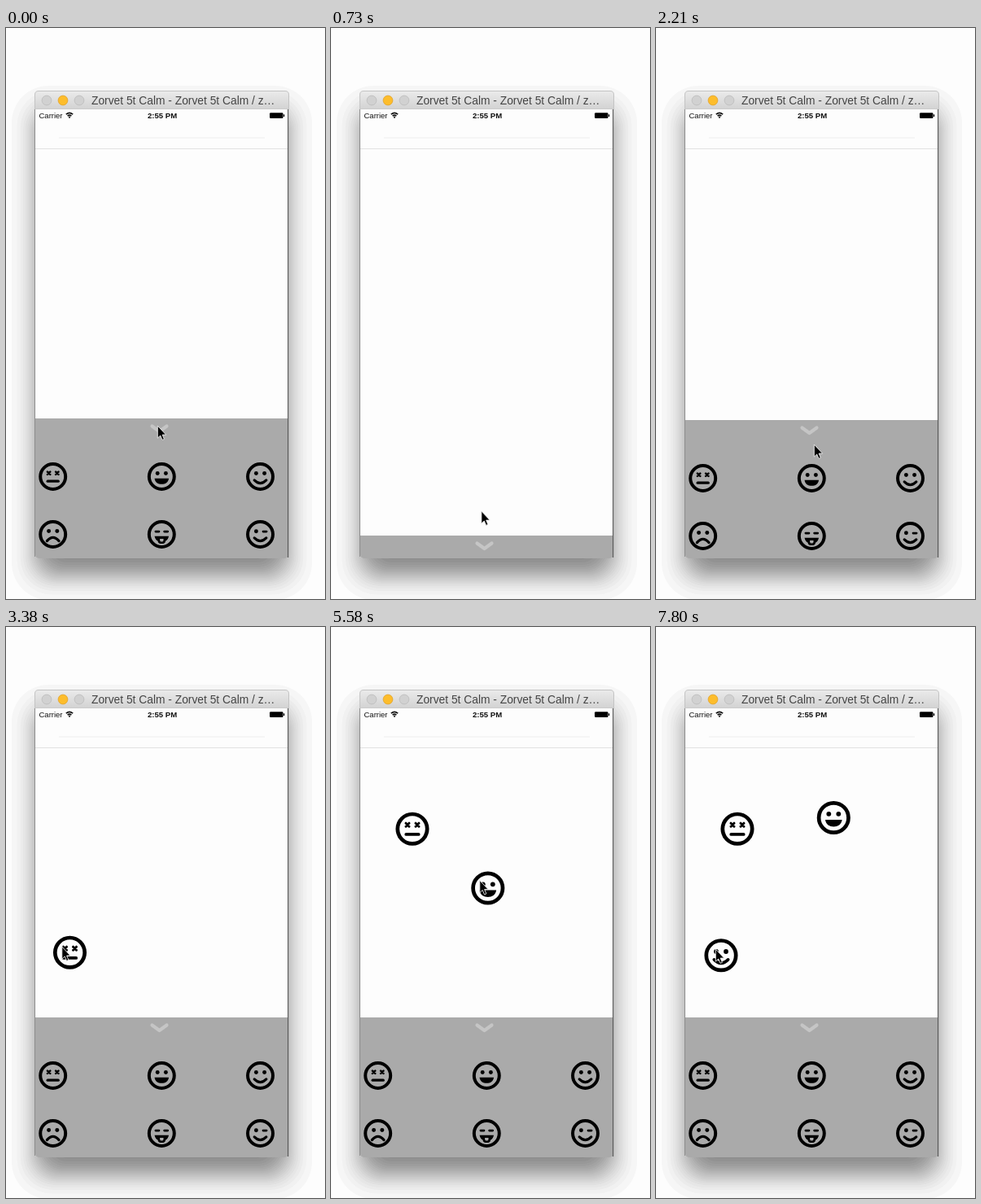
Recreate the animation shown at these times as an HTML page. Size 392 by 702 pixels, loop 8000 ms.

```html
<!DOCTYPE html>
<html lang="en">
<head>
<meta charset="utf-8">
<title>Emoji tray</title>
<style>
html, body { margin: 0; width: 100%; height: 100%; overflow: hidden; background: #fdfdfd; }
svg { display: block; width: 392px; height: 702px; }
text { font-family: "Liberation Sans", Arial, sans-serif; }
.line { fill: none; stroke: #000; stroke-linecap: round; stroke-linejoin: round; stroke-width: 3.8; }
.thin { stroke-width: 3; }
</style>
</head>
<body>
<svg viewBox="0 0 392 702">
  <defs>
    <linearGradient id="bar" x2="0" y2="1">
      <stop offset="0" stop-color="#ebebeb"/>
      <stop offset="1" stop-color="#d2d2d2"/>
    </linearGradient>
    <clipPath id="screen"><path d="M36 100H347V648q0 4-4 4H40q-4 0-4-4Z"/></clipPath>
    <circle id="ring" r="18.2" class="line" style="stroke-width:4.7"/>
    <g id="eyes"><circle cx="-6" cy="-4.7" r="2.9"/><circle cx="6" cy="-4.7" r="2.9"/></g>
    <path id="beam" class="line" d="M-8.6 5.2Q0 14 8.6 5.2"/>
    <g id="dead">
      <use href="#ring"/>
      <path class="line thin" d="M-8-7l4 4m0-4l-4 4M4-7l4 4m0-4l-4 4"/>
      <path class="line" d="M-7.7 6.7H7.7"/>
    </g>
    <g id="grin">
      <use href="#ring"/><use href="#eyes"/>
      <path d="M-10.3 2.5H10.3C9.5 8.2 5.2 11 0 11S-9.5 8.2-10.3 2.5Z"/>
    </g>
    <g id="smile"><use href="#ring"/><use href="#eyes"/><use href="#beam"/></g>
    <g id="sad">
      <use href="#ring"/><use href="#eyes"/>
      <path class="line" d="M-8.6 9.6Q0-.6 8.6 9.6"/>
    </g>
    <g id="tongue">
      <use href="#ring"/>
      <path class="line thin" d="M-8.8-4h5M3.8-4h5"/>
      <path d="M-10.3 2.5H10.3C9.5 6.5 7.5 8.6 5.5 9.6a5.5 4 0 0 1-11 0C-7.5 8.6-9.5 6.5-10.3 2.5Z"/>
      <path d="M-2.6 6.4H2.6V8.4a2.6 2.2 0 0 1-5.2 0Z" fill="#aaa"/>
    </g>
    <g id="wink">
      <use href="#ring"/><use href="#beam"/>
      <circle cx="-6" cy="-4.4" r="2.9"/>
      <path class="line thin" d="M4-4h5"/>
    </g>
  </defs>

  <rect width="392" height="702" fill="#fdfdfd"/>
  <g id="shadow"></g>

  <path d="M35.5 100V82q0-4.5 4.5-4.5H343q4.5 0 4.5 4.5V100Z" fill="url(#bar)" stroke="#c4c4c4"/>
  <g stroke-width=".8">
    <circle cx="50" cy="89" r="5.9" fill="#d1d1d1" stroke="#bcbcbc"/>
    <circle cx="70" cy="89" r="5.9" fill="#fdbd2c" stroke="#e0a32c"/>
    <circle cx="90" cy="89" r="5.9" fill="#d1d1d1" stroke="#bcbcbc"/>
  </g>
  <text x="105" y="94" font-size="13.8" fill="#454545">Zorvet 5t Calm - Zorvet 5t Calm / z…</text>

  <g clip-path="url(#screen)">
    <rect x="36" y="100" width="311" height="552" fill="#fdfdfd"/>
    <path d="M36 99.5H347" stroke="#b5b5b5"/>
    <text x="40.5" y="111" font-size="9.5" fill="#111">Carrier</text>
    <text x="174" y="111" font-size="9.6" font-weight="bold" fill="#111">2:55 PM</text>
    <g fill="none" stroke="#111" stroke-width="1.6">
      <path d="M73.8 106.2q4.2-3.6 8.4 0M75.6 108.1q2.4-1.9 4.8 0"/>
      <circle cx="78" cy="109.6" r=".4"/>
    </g>
    <rect x="324" y="104.3" width="16.5" height="6.6" rx="1.2"/>
    <path d="M341.6 106.2v2.8" stroke="#000" stroke-width="1.2"/>
    <path d="M65 135H318" stroke="#f3f3f3" stroke-width="1.5"/>
    <path d="M36 148.5H347" stroke="#e2e2e2"/>
    <g id="tray">
      <rect x="36" width="311" height="240" fill="#aaa"/>
      <path d="M179.5 9.5l9 6.5 9-6.5" fill="none" stroke="#c5c5c5" stroke-width="4.2" stroke-linecap="round" stroke-linejoin="round"/>
    </g>
  </g>
  <path d="M35.5 100V650" stroke="#8d8d8d"/>
  <path d="M346.6 100V651" stroke="#555" stroke-width="1.1"/>

  <g id="drops"></g>
  <path id="cursor" d="M.3 0V15.2L3.7 12 6 17.4 8.4 16.4 6.1 11.1H10.6Z" stroke="#eee" stroke-width=".9"/>
</svg>
<script>
const LOOP = 8000, STEP = 147, LAST = 53;
const OPEN = 480, CLOSED = 621;
const $ = id => document.getElementById(id);

function add(parent, tag, attrs) {
  const el = document.createElementNS('http://www.w3.org/2000/svg', tag);
  for (const k in attrs) el.setAttribute(k, attrs[k]);
  parent.append(el);
  return el;
}
const move = (el, [x, y]) => el.setAttribute('transform', `translate(${x} ${y})`);

// Banded window shadow: equal grey steps along a soft falloff
for (let a = 0.026; a < 0.46; a += 0.022) {
  const d = 10 * Math.log(0.5 / a - 1), g = Math.round(253 * (1 - a));
  add($('shadow'), 'rect', {
    x: 36 - d, y: 100 - d, width: 311 + 2 * d, height: 574 + 2 * d,
    rx: 31 + 0.5 * d, fill: `rgb(${g},${g},${g})`
  });
}

['dead', 'grin', 'smile', 'sad', 'tongue', 'wink'].forEach((name, i) =>
  add($('tray'), 'use', {
    href: '#' + name,
    transform: `translate(${[57.7, 191.3, 312.5][i % 3]} ${i < 3 ? 71.5 : 142.5}) scale(.85)`
  }));

const spring = (t, from, to, decay, freq) =>
  to + (from - to) * Math.exp(-decay * t) * Math.cos(freq * t);

// Closes with a bounce, later opens without one
const trayTop = s => s < 11.3
  ? spring(Math.max(0, s - 0.4), OPEN, CLOSED, 0.8, 1.96)
  : spring(s - 11.3, CLOSED, OPEN, 1.15, 0);

// Pointer stops: step, x, y
const stops = [
  [0, 186, 489], [7, 184, 636], [10, 184, 636], [12, 184, 538], [15, 194, 512], [19, 313, 621],
  [21, 47, 545], [25, 90, 241], [27, 90, 241], [33, 175, 534], [34, 185, 546],
  [35, 157, 398], [41, 208, 225], [42, 208, 225], [44, 306, 521], [49, 306, 544], [53, 73, 396]
];

function pointer(s) {
  const i = Math.max(1, stops.findIndex(k => k[0] >= s));
  const [t0, x0, y0] = stops[i - 1], [t1, x1, y1] = stops[i];
  const p = (s - t0) / (t1 - t0);
  return [x0 + (x1 - x0) * p, y0 + (y1 - y0) * p];
}

// A face hangs on the pointer from pick to drop, then stays
const faces = [
  { name: 'dead', pick: 22, drop: 25, grip: [10, 7.2] },
  { name: 'grin', pick: 35, drop: 41, grip: [10.3, 9.5] },
  { name: 'smile', pick: 49, drop: 53, grip: [7, 7.7] }
];
for (const f of faces) f.el = add($('drops'), 'use', { href: '#' + f.name });

function draw(s) {
  move($('tray'), [0, Math.round(trayTop(s))]);
  move($('cursor'), pointer(s));
  for (const { el, pick, drop, grip } of faces) {
    const [x, y] = pointer(Math.min(s, drop));
    el.style.display = s < pick ? 'none' : '';
    move(el, [x + grip[0], y + grip[1]]);
  }
}

const start = performance.now();
function tick() {
  const t = (performance.now() - start) % LOOP;
  draw(Math.min(LAST, Math.floor((t + 8) / STEP)));
  requestAnimationFrame(tick);
}
tick();
</script>
</body>
</html>
```
